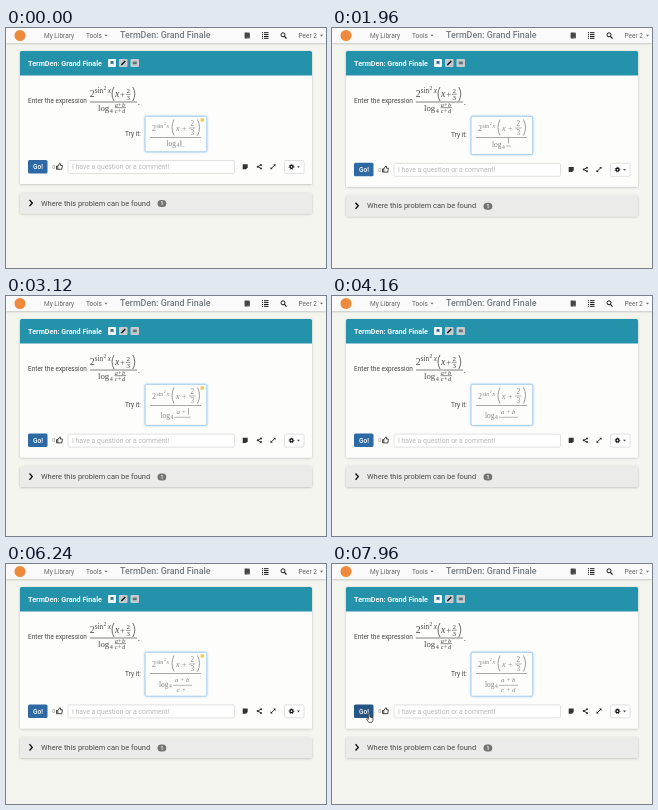
Animation, 320 px wide and 240 px high, one loop 8000 ms. Source, as an HTML page:

```html
<!DOCTYPE html>
<html lang="en">
<head>
<meta charset="utf-8">
<title>Expression entry</title>
<style>
html, body { margin: 0; width: 100%; height: 100%; overflow: hidden; background: #f5f5f0; }
svg { display: block; width: 100vw; height: 100vh; font: 6.5px Roboto, sans-serif; fill: #484848; }
.m { font-family: "Liberation Serif", serif; }
.i { font-style: italic; }
.l { fill: none; stroke: currentColor; }
</style>
</head>
<body>
<svg viewBox="0 0 320 240">
  <defs>
    <filter id="soft" x="-10%" y="-20%" width="120%" height="150%">
      <feDropShadow dx="0" dy=".6" stdDeviation="1.3" flood-color="#000" flood-opacity=".25"/>
    </filter>
    <filter id="glow" x="-10%" y="-20%" width="120%" height="140%">
      <feDropShadow dx="0" dy="0" stdDeviation="1.3" flood-color="#66afe9" flood-opacity=".5"/>
    </filter>
  </defs>

  <g id="nav" fill="#666">
    <rect y="-4" width="320" height="19" fill="#fafafa" filter="url(#soft)"/>
    <circle cx="14" cy="7.5" r="5.5" fill="#ef8a3c"/>
    <text x="38" y="9.6">My Library</text>
    <text x="80" y="9.6">Tools</text>
    <path d="M98.500 6.700h3l-1.500 1.700z"/>
    <text x="114" y="10.4" font-size="8.9" font-weight="500" fill="#747b80">TermDen: Grand Finale</text>
    <rect x="238.500" y="4.500" width="5.500" height="6" rx=".8" fill="#666"/>
    <path class="l" stroke="#fff" stroke-width=".6" d="M240 4.500v6M241 6.200h2.200M241 8h2.200"/>
    <path class="l" stroke="#666" stroke-width=".9" d="M256 4.700h1m1 0h4.500M256 6.600h1m1 0h4.500M256 8.500h1m1 0h4.500M256 10.300h1m1 0h4.500"/>
    <circle class="l" cx="277" cy="6.800" r="2" stroke="#777" stroke-width=".9"/>
    <path class="l" stroke="#777" stroke-width="1.1" d="M278.500 8.400l2 2.200"/>
    <text x="292.5" y="9.6">Peer 2</text>
    <path d="M314 6.700h3l-1.500 1.700z"/>
  </g>

  <g filter="url(#soft)">
    <rect id="card" x="14" y="23" width="292" height="133" rx="1.5" fill="#fdfdfb"/>
  </g>
  <path d="M14 47.500V24.500q0-1.500 1.500-1.500h289q1.500 0 1.500 1.500V47.500z" fill="#2592ab"/>
  <text x="22" y="37.700" font-size="7.2" font-weight="700" fill="#f4fafb">TermDen: Grand Finale</text>
  <rect x="102" y="31" width="8" height="8" rx="1" fill="#f4fafb"/>
  <path d="M104.500 33h3v3.500l-1.500-1l-1.500 1z" fill="#34708f"/>
  <rect x="113" y="31" width="8.500" height="8" rx="1" fill="#c3cbce"/>
  <path class="l" stroke="#66757b" stroke-width="1.200" d="M115.300 37l4-4"/>
  <rect x="124.500" y="31" width="8.500" height="8" rx="1" fill="#c3cbce"/>
  <path d="M126.800 33.500h4v2.800h-4z" fill="#66757b"/>

  <text x="22" y="75.300">Enter the expression</text>
  <g id="prompt" color="#484848"></g>

  <text id="try" x="119" y="107.700">Try it:</text>
  <rect id="box" x="139" y="88.300" width="61.800" height="35.500" rx="1.500" fill="#fdfdfb" stroke="#9ccbee" stroke-width=".9" filter="url(#glow)"/>
  <rect id="warn" x="194.500" y="90.300" width="3.500" height="3.500" rx=".8" fill="#f0cf4a"/>
  <g id="entry" color="#858585" fill="#858585"></g>

  <g id="lower">
    <rect id="go" x="22" y="132" width="19.500" height="13.500" rx="1.500" fill="#2d69a2"/>
    <text x="27" y="141.200" font-weight="500" fill="#fff">Go!</text>
    <text x="46.300" y="140.800" font-size="5.500" fill="#888">0</text>
    <path class="l" stroke="#808080" stroke-width=".7" d="M50.500 138h1.300v3.300h-1.300zM52 138l1.800-2.800q1.200 0 .6 2.200h2l-.6 3.900H52"/>
    <rect x="62" y="132.500" width="166.500" height="13" rx="1.500" fill="#fff" stroke="#d8d8d8" stroke-width=".8"/>
    <text x="66" y="141.400" font-size="6.850" fill="#b8b8b8">I have a question or a comment!</text>
    <path d="M236.700 136.200h5v3.400l-1.700 1.700h-3.300z" fill="#333"/>
    <path class="l" stroke="#333" stroke-width=".8" d="M255 136.900l-3.300 1.800l3.300 1.800"/>
    <g fill="#333"><circle cx="255" cy="136.900" r="1"/><circle cx="251.700" cy="138.700" r="1"/><circle cx="255" cy="140.500" r="1"/></g>
    <path d="M267.200 136.200h2.300v2.300zM264.500 138.900v2.300h2.300z" fill="#333"/>
    <path class="l" stroke="#333" stroke-width=".8" d="M265 140.700l4-4"/>
    <rect x="278.500" y="132.500" width="19.500" height="13" rx="1.500" fill="#fff" stroke="#d8d8d8" stroke-width=".8"/>
    <circle class="l" cx="285.500" cy="138.800" r="1.500" stroke="#444" stroke-width="1.200"/>
    <circle class="l" cx="285.500" cy="138.800" r="2.400" stroke="#444" stroke-width=".8" stroke-dasharray=".942"/>
    <path d="M291 138.200h3l-1.500 1.800z"/>
    <rect x="14" y="165" width="292" height="20.500" rx="1.500" fill="#ebebe9" filter="url(#soft)"/>
    <path class="l" stroke="#333" stroke-width="1.300" d="M23.500 171.900l2.800 3.100l-2.800 3.100"/>
    <text x="35" y="177.700" font-size="7.450">Where this problem can be found</text>
    <rect x="151.500" y="172" width="8.800" height="7" rx="3.500" fill="#747474"/>
    <text x="154.500" y="177.400" font-size="5" font-weight="700" fill="#fff">1</text>
  </g>

  <g id="pointer">
    <path id="arrow" d="M0 0v8l2-1.800l1.300 2.900l1.300-.6l-1.300-2.800h2.700z" fill="#111" stroke="#fff" stroke-width=".6"/>
    <path id="hand" d="M-.6 .5q.8-1 1.500 0v2.500l3.100.8v2.500l-1 2H-.3l-2.200-3.300q.6-.8 1.900.4z" fill="#fff" stroke="#222" stroke-width=".7"/>
  </g>
</svg>
<script>
const LOOP = 8000;
const $ = id => document.getElementById(id);
const set = (id, name, value) => $(id).setAttribute(name, value);
const show = (id, on) => set(id, 'visibility', on ? 'visible' : 'hidden');

const glyph = (s, x, y, size) =>
  `<text class="m${/[a-z]/.test(s) && s.length < 2 ? ' i' : ''}" x="${x}" y="${y}" font-size="${size}">${s}</text>`;
const line = (d, w = .6) => `<path class="l" d="${d}" stroke-width="${w}"/>`;
const bar = (x, y, w, weight) => line(`M${x} ${y}h${w}`, weight);
const paren = (x, y, h, bend) => line(`M${x} ${y}q${bend} ${h / 2} 0 ${h}`, .8);

$('prompt').innerHTML =
  glyph('2', 83.700, 69, 9.8) + glyph('sin', 88.800, 64.700, 7.2) + glyph('2', 97.500, 61.500, 5.6) +
  glyph('x', 101.700, 64.700, 7.2) + paren(108, 59, 14, -4) + glyph('x', 109, 69, 9.8) +
  glyph('+', 114, 69, 9) + glyph('2', 120.500, 64.800, 7) + bar(120, 66.300, 4.500, .6) +
  glyph('3', 120.500, 72.400, 7) + paren(126.800, 59, 14, 4) + bar(84, 74, 47, .7) +
  glyph('log', 92, 83.300, 8.8) + glyph('4', 103.700, 85, 6.2) +
  glyph('a', 108.800, 78.500, 6.2) + glyph('+', 112.100, 78.500, 5.8) + glyph('b', 116, 78.500, 6.2) +
  bar(108.500, 79.700, 11.500) +
  glyph('c', 108.800, 84.800, 6.2) + glyph('+', 112.100, 84.800, 5.8) + glyph('d', 116, 84.800, 6.2) +
  glyph('.', 131.800, 76.500, 9);

const top2 =
  glyph('2', 146, 102.500, 8) + glyph('sin', 150.500, 99.500, 5.8) + glyph('2', 157.700, 97, 4.2) +
  glyph('x', 160.500, 99.500, 5.8) + paren(168, 91.500, 16, -4) + glyph('x', 170, 102.500, 8) +
  glyph('+', 176, 102.500, 7.600) + glyph('2', 184.500, 98, 7.2) + bar(183, 100, 6.500) +
  glyph('3', 184.500, 106.700, 7.2) + paren(191.500, 91.500, 16, 4) + bar(144, 109.500, 51, .7);

// time, layout step, numerator, denominator, caret row
const steps = [
  [0, 0, '', '', 0],
  [1760, 1, '', '', 0],
  [2600, 2, 'a', '', 0],
  [3040, 2, 'a+', '', 0],
  [3480, 2, 'a+b', '', 0],
  [4280, 2, 'a+b', '', 1],
  [4640, 3, 'a+b', 'c', 1],
  [5760, 3, 'a+b', 'c+', 1],
  [6720, 3, 'a+b', 'c+d', 1]
];
const caretOff = [[300, 780], [1260, 1760], [2240, 2600], [3960, 4280], [5120, 5760], [6240, 6720], [7200, LOOP]];
const warnOn = [[0, 1760], [3040, 3480], [5760, 6720]];
const within = (list, t) => list.some(([a, b]) => t >= a && t < b);

const width = s => [1, 4, 12, 15][s.length];
const caretAt = (x, y) => line(`M${x} ${y}v-6.5`, .7);

function row(s, mid, y, caret) {
  const x = mid - width(s) / 2;
  const text = [...s].map((c, i) => glyph(c, x + i * 5.5, y, 6.8)).join('');
  return text + (caret ? caretAt(x + width(s) - (s ? 0 : .5), y + .8) : '');
}

function entry([, step, num, den, caretRow], caret) {
  const w = step ? Math.max(width(num), width(den)) + 4 : 4;
  const x = 169.500 - (14 + w) / 2, left = x + 14, mid = left + w / 2;
  const y = [117.500, 119, 121.500, 122.500][step];
  const log = glyph('log', x, y, 7.4) + glyph('4', x + 10, y + 1.5, 5.6);
  if (!step) return log + bar(left + 1, 118.500, 3, .3) + (caret ? caretAt(174.800, 118.500) : '');
  const mark = step > 1 ? 121.300 : 118;
  return log + bar(left, mark, w) +
    row(num, mid, mark - 3.500, caret && !caretRow) +
    row(den, mid, mark + 6.700, caret && caretRow);
}

function draw(t) {
  const now = steps.findLast(s => t >= s[0]);
  const drop = now[1] * 2.8;
  set('card', 'height', 133 + drop);
  set('box', 'height', 35.500 + drop);
  set('try', 'y', 107.700 + drop / 2);
  set('lower', 'transform', `translate(0 ${drop})`);
  show('warn', within(warnOn, t));
  $('entry').innerHTML = top2 + entry(now, !within(caretOff, t));

  const p = Math.min(1, Math.max(0, (t - 7200) / 680));
  const ease = p * p * (3 - 2 * p);
  const x = 125 - 88 * ease, y = 82 + 68 * ease;
  const over = x < 41.500 && y > 140;
  set('pointer', 'transform', `translate(${x} ${y})`);
  show('arrow', p > 0 && !over);
  show('hand', over);
  set('go', 'fill', over ? '#275584' : '#2d69a2');
}

function tick(time) {
  draw(time % LOOP);
  requestAnimationFrame(tick);
}
draw(0);
requestAnimationFrame(tick);
</script>
</body>
</html>
```
